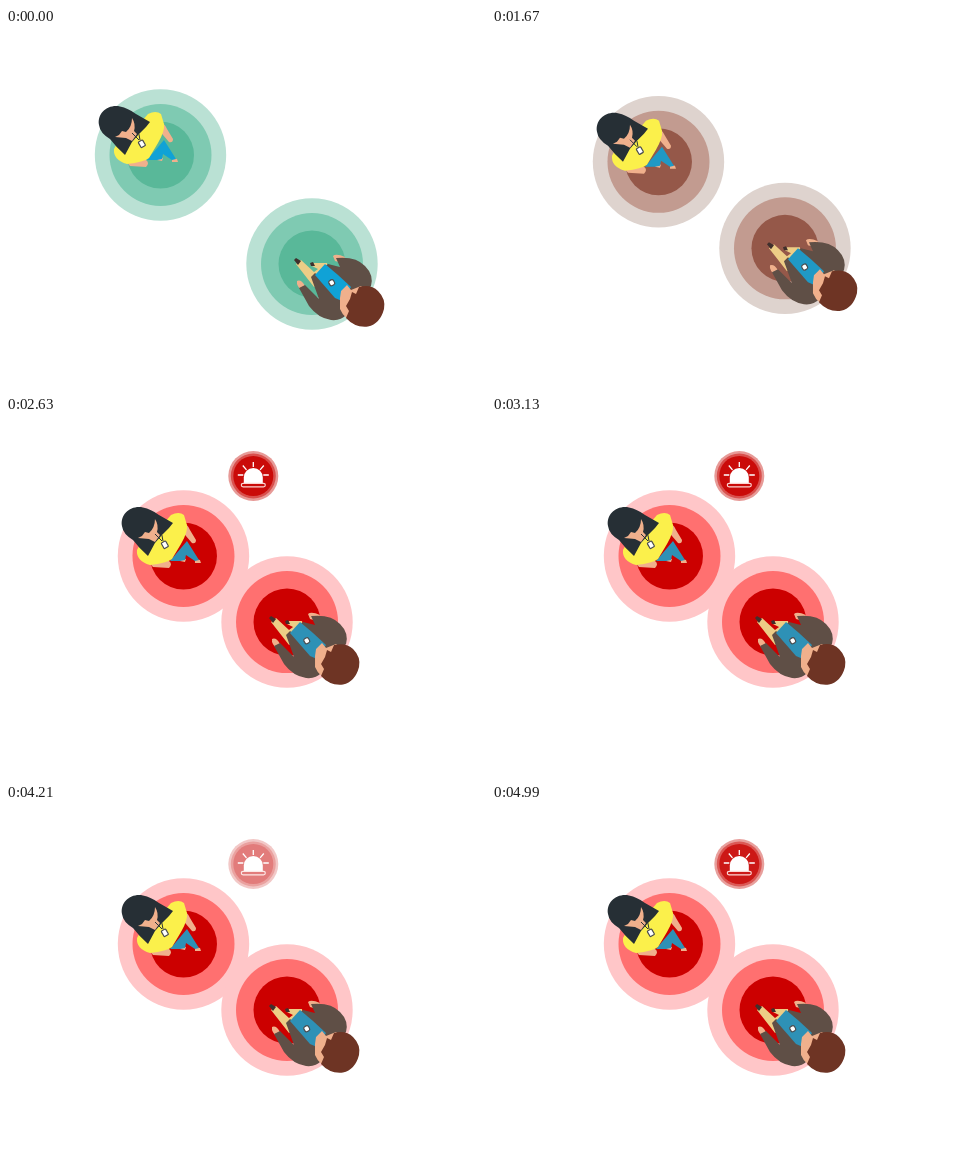
These frames come from a looping animation (480x360 px, 5.05 s). An HTML page:

```html
<!DOCTYPE html>
<html lang="en">
<head>
<meta charset="utf-8">
<title>Distance alert</title>
<style>
html, body { margin: 0; width: 100%; height: 100%; overflow: hidden; background: #fff; }
svg { display: block; width: 100vw; height: 100vh; }
.outer { fill: var(--outer); }
.middle { fill: var(--middle); }
.inner { fill: var(--inner); }
.blue { fill: var(--blue); }
.skin { fill: #f0b08c; }
.hair { fill: #262f35; }
.coat { fill: #5f4f46; }
.tan { fill: #edcd86; }
.line { fill: none; stroke: #2b3338; stroke-width: 1; }
.badge { fill: #fff; stroke: #4a4c4e; stroke-width: 1.2; }
</style>
</head>
<body>
<svg viewBox="0 0 480 360">
  <defs>
    <g id="zone">
      <circle class="outer" r="65.7"/>
      <circle class="middle" r="51"/>
      <circle class="inner" r="33.5"/>
    </g>
  </defs>

  <g id="woman">
    <use href="#zone" x="154.5" y="127"/>
    <path class="skin" d="M166 130l5 1 1 3-6 0zM153 129l4 1-1 3-5-1z"/>
    <path class="blue" d="M141 132L158 112 170 131 166 132 157 126 156 131 151 132z"/>
    <path class="skin" d="M151 94Q156 91 161 101L167 111Q167 115 163 114L157 107 152 101z"/>
    <path class="skin" d="M119 132L140 132Q144 135 140 139L124 138z"/>
    <path fill="#fbf04b" d="M108 121L113 112 130 100 142 86Q150 82 155 86L158 96Q159 103 152 115L143 130Q138 134 121 136 107 132 108 121z"/>
    <path class="hair" d="M93 97C91 85 102 76 114 78.5Q122 80 130 86L144 94 140 99 133 106 126 114 119 127Q110 119 104 111 94 105 93 97z"/>
    <path class="skin" d="M126 90Q130 96 128 103L131 106 126 113 120 110 109 109 113 107 116 103 120 104Q126 99 126 90z"/>
    <path class="line" d="M126 105L133 112M130 102Q134 106 134 112"/>
    <rect class="badge" x="133.5" y="112.5" width="5" height="6.5" rx="1" transform="rotate(-30 136 116)"/>
  </g>

  <g id="man">
    <use href="#zone" x="306" y="236"/>
    <path class="tan" d="M290 236L295 232 308 244 312 241 306 238 308 235 321 235 322 243 313 256 308 259z"/>
    <path fill="#40302d" d="M288 232L290 230 295 233 292 237zM304 235L307 234 309 238 305 238z"/>
    <path class="skin" d="M327 228Q330 225 339 229L336 235 329 233zM291 253Q295 251 299 258L302 265 297 264Q290 258 291 253z"/>
    <path class="coat" d="M330 230Q350 228 359 238 368 247 365 258L358 265 340 264 319 243 317 240 322 236 334 239z"/>
    <path class="coat" d="M293 260L299 257 313 271 305 249 309 245 337 266 340 287Q335 293 325 292 312 290 303 278z"/>
    <path class="blue" d="M309 247L319 236 332 247 345 259 336 273 329 270z"/>
    <path class="skin" d="M334 270L335 263 341 257 345 262 355 258 362 264 350 293Q339 293 334 281z"/>
    <path fill="#6e3424" d="M340 290L343 283 340 278 344 271 346 264 350 266 353 259Q365 256 372 263 380 271 378 281 374 296 362 298.500 349 300 340 290z"/>
    <rect class="badge" x="323.3" y="251.8" width="5.2" height="5.6" rx="1.8" transform="rotate(-30 326 255)"/>
  </g>

  <g id="siren" transform="translate(247.3 60)">
    <circle r="25" fill="#e79a97"/>
    <circle r="22.5" fill="#d9504d"/>
    <circle r="20" fill="#ca0b09"/>
    <path fill="#fff" d="M-9.5 8V1.5A9.5 9.5 0 0 1 9.5 1.5V8z"/>
    <rect x="-12" y="7.3" width="24" height="3.6" rx="1.8" fill="#ca0b09" stroke="#fbd5d2" stroke-width="1.2"/>
    <path stroke="#fff" stroke-width="1.3" d="M0-14V-9M-10.5-10.5L-6.8-6.2M10.5-10.5L6.8-6.2M-15.5-1H-10M15.5-1H10"/>
  </g>
</svg>
<script>
const LOOP = 5050, START = 1130, END = 2680, PULSE = 3130, PERIOD = 640;
const colors = {
  outer: [[186, 225, 212], [255, 198, 200]],
  middle: [[127, 202, 178], [255, 112, 112]],
  inner: [[89, 184, 153], [204, 0, 0]],
  blue: [[16, 162, 214], [46, 145, 182]]
};
const byId = id => document.getElementById(id);
const clamp = x => Math.min(1, Math.max(0, x));
const span = (t, from, to) => clamp((t - from) / (to - from));
const move = (id, x, y) => byId(id).setAttribute("transform", `translate(${x} ${y})`);

function sirenOpacity(t) {
  if (t < PULSE) return span(t, 2030, 2600);
  return 0.66 + 0.34 * Math.cos((t - PULSE) / PERIOD * 2 * Math.PI);
}

function draw(t) {
  const p = Math.sin(span(t, START, END) * Math.PI / 2);
  move("woman", 23 * p, 13 * p);
  move("man", -25 * p, -30 * p);
  for (const [name, [a, b]] of Object.entries(colors)) {
    const mix = a.map((v, i) => Math.round(v + (b[i] - v) * p));
    document.documentElement.style.setProperty("--" + name, `rgb(${mix})`);
  }
  byId("siren").setAttribute("opacity", sirenOpacity(t));
}

const begin = performance.now();
function tick() {
  draw((performance.now() - begin) % LOOP);
  requestAnimationFrame(tick);
}
tick();
</script>
</body>
</html>
```
